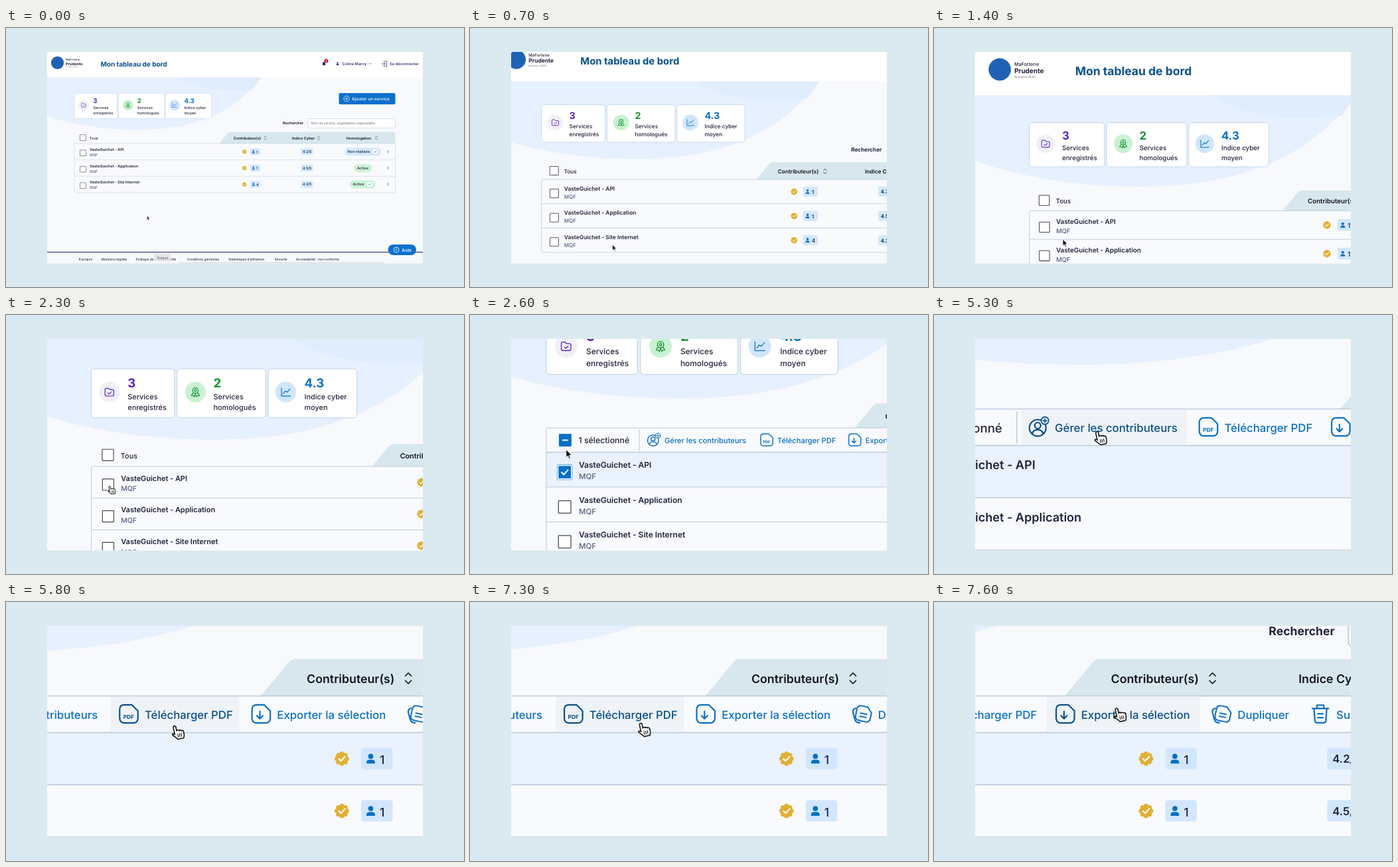
Write an HTML page that moves like this. It is 690 by 390 pixels and loops after 8000 ms.

```html
<!DOCTYPE html>
<html lang="fr">
<head>
<meta charset="utf-8">
<title>Tableau de bord</title>
<style>
  html, body { margin: 0; width: 100%; height: 100%; overflow: hidden; background: #dbeaf0; }
  svg { display: block; width: 690px; height: 390px; }
  text { font-family: Inter, "Open Sans", sans-serif; text-rendering: geometricPrecision; white-space: pre; }
  .line { fill: none; stroke-linecap: round; stroke-linejoin: round; }
</style>
</head>
<body>
<svg id="stage" viewBox="0 0 690 390"></svg>
<script>
const INK = '#23233c', NAVY = '#1c1c78', BLUE = '#0a6fc4', DEEP = '#0a4f8c', BORDER = '#bccbdd';
const ROW_TOP = 174, ROW_H = 24.6, BAR_H = 17.2;

// Drawing helpers
const text = (x, y, size, str, fill = INK, weight = 500) =>
  `<text x="${x}" y="${y}" font-size="${size}" fill="${fill}" font-weight="${weight}">${str}</text>`;
const rect = (x, y, w, h, r, fill, stroke = 'none', sw = .5) =>
  `<rect x="${x}" y="${y}" width="${w}" height="${h}" rx="${r}" fill="${fill}" stroke="${stroke}" stroke-width="${sw}"/>`;
const circle = (x, y, r, fill, stroke = 'none', sw = .6) =>
  `<circle cx="${x}" cy="${y}" r="${r}" fill="${fill}" stroke="${stroke}" stroke-width="${sw}"/>`;
const line = (d, stroke, sw = .6) => `<path class="line" d="${d}" stroke="${stroke}" stroke-width="${sw}"/>`;
const shape = (d, fill) => `<path d="${d}" fill="${fill}"/>`;
const at = (x, y, content, id = '') => `<g ${id && `id="${id}"`} transform="translate(${x} ${y})">${content}</g>`;
const group = (id, content) => `<g id="${id}">${content}</g>`;

const person = fill => circle(0, -1.2, 1.2, fill) + shape('M-2 2.2V1.7Q-2 .4-.6 .4H.6Q2 .4 2 1.7V2.2z', fill);
const tick = (color, sw) => line('M-1.4 .1L-.4 1.1L1.5-1', color, sw);
const sorter = x => at(x, 165.7, line('M-1.4-1.1L0-2.5L1.4-1.1M-1.4 1.1L0 2.5L1.4 1.1', INK, .55));
const box = (x, y) => rect(x, y, 8.8, 8.8, .3, '#fff', '#45454f', .6);

function page() {
  const curve = 'M40 72V124Q50 129 62 133C104 147 150 153.2 200 153.2C290 153 350 124 385 72z';
  return rect(30, 30, 640, 360, 0, '#f8f9fd') + shape(curve, '#e6f0fe') +
    shape('M258 74Q298 101 372 92L385 74z', '#dfedfc') + rect(30, 20, 640, 54.5, 0, '#fff');
}

function header() {
  const bell = shape('M-2.8 1.8Q-2 1-2-.6Q-2-2.8 0-2.8Q2-2.8 2-.6Q2 1 2.8 1.8zM-.9 2.3H.9Q0 3.6-.9 2.3z', NAVY);
  return circle(77.5, 52.4, 9.6, '#1f62b5') +
    text(90, 49.2, 4.1, 'MaForterie') + text(90, 55.7, 5.7, 'Prudente', INK, 700) +
    text(90, 59.4, 2.2, 'Innovation ORVEL', '#777') +
    text(142.5, 57.6, 10, 'Mon tableau de bord', '#0b5090', 700) +
    at(479, 54, bell) + circle(482.4, 49.4, 3, '#d01f2e') + text(481.3, 51, 4.2, '1', '#fff', 600) +
    at(499.5, 53.8, person(NAVY)) + text(506.5, 56, 5.8, 'Coline Marvy', NAVY) +
    line('M547 53L548.6 54.6L550.2 53', NAVY) +
    line('M569 50.2H573.6V57.8H569M566 54H571.3M569.6 52.2L571.4 54L569.6 55.8', NAVY, .7) +
    text(578, 56, 5.8, 'Se déconnecter', NAVY);
}

function cards() {
  const folder = line('M-3.4-2Q-3.4-3-2.4-3H-.8L.3-1.9H2.4Q3.4-1.9 3.4-.9V2Q3.4 3 2.4 3H-2.4Q-3.4 3-3.4 2zM-1.2 .6L-.2 1.5L1.4-.2', '#5a20c0');
  const medal = circle(0, -1.2, 2.2, 'none', '#14912f') + circle(0, -1.2, .8, 'none', '#14912f') +
    line('M-1.7 .6L-3.2 2.6L-1.7 2.7L-.9 3.7L.2 1.2M1.7 .6L3.2 2.6L1.7 2.7L.9 3.7L-.2 1.2', '#14912f');
  const chart = line('M-3.4-3.2V3.1H3.6M-2 1.2L-.4-.9L1 .1L3.2-2.6', '#0a6fc4');
  return [
    [103, 64.6, '3', 'Services', 'enregistrés', '#5a20c0', '#f0f0f6', folder, 117, 131.2],
    [169.5, 69, '2', 'Services', 'homologués', '#14912f', '#c9f1d2', medal, 183.8, 197.8],
    [240.3, 69, '4.3', 'Indice cyber', 'moyen', '#0a6fc4', '#d0e6fc', chart, 254, 268.4],
  ].map(([x, w, value, top, bottom, color, tint, icon, iconX, textX]) =>
    rect(x, 98.2, w, 38, 2.5, '#fff', '#bdd0ea') + circle(iconX, 116.3, 8, tint) + at(iconX, 116.3, icon) +
    text(textX, 112.7, 9.6, value, color, 700) +
    text(textX, 121.9, 5.6, top) + text(textX, 130.2, 5.6, bottom)).join('');
}

function search() {
  return rect(501.5, 98, 85, 17, 2, '#0c70cc') + circle(513, 106.5, 4.1, 'none', '#fff', .7) +
    line('M511 106.5H515M513 104.5V108.5', '#fff', .7) +
    text(521, 108.8, 6.5, 'Ajouter un service', '#fff') +
    text(417, 145.4, 5.5, 'Rechercher', INK, 700) + rect(454.5, 136.5, 132, 14.1, 2, '#fff', BORDER, .6) +
    text(459.5, 145.2, 4.85, 'Nom du service, organisation responsable', '#62626e', 400);
}

function tableHead() {
  return shape('M321 174L334.4 157.9Q335.5 156.6 337.3 156.6H583.5Q586.5 156.6 586.5 159.6V174z', '#d7e7ed') +
    text(342.7, 167.8, 5.55, 'Contributeur(s)', '#15151f', 600) + sorter(390.5) +
    text(431, 167.8, 5.55, 'Indice Cyber', '#15151f', 600) + sorter(471) +
    text(512.7, 167.8, 5.55, 'Homologation', '#15151f', 600) + sorter(558) +
    group('all', box(111.4, 160.7) + text(125.8, 167.7, 5.6, 'Tous'));
}

function rows() {
  const badge = Array.from({ length: 8 }, (_, i) => {
    const a = i * Math.PI / 4;
    return circle(2.3 * Math.cos(a), 2.3 * Math.sin(a), 1.1, '#e0b034');
  }).join('') + circle(0, 0, 2.7, '#e0b034') + tick('#fff', .65);

  const data = [
    ['API', 1, '4.2', 'Non réalisée', 510, 55, '#d4e8fc', true],
    ['Application', 1, '4.5', 'Active', 524.5, 27, '#cdf2d6', false],
    ['Site Internet', 4, '4.3', 'Active', 518, 38.5, '#cdf2d6', true],
  ];
  const cells = data.map(([name, people, score, status, x, w, tint, checked], i) =>
    at(0, ROW_TOP + i * ROW_H,
      (i ? '' : group('picked', rect(103, 0, 483.5, ROW_H, 0, '#e9f2fd'))) +
      (i ? line('M103 0H586.5', BORDER, .5) : '') +
      box(111.6, 9.7) +
      text(126, 11.1, 5.65, 'VasteGuichet - ' + name, INK, 600) + text(126, 19.1, 5.4, 'MQF', '#5a5f84') +
      at(359.2, 12.3, badge) +
      rect(368.3, 7.2, 14.8, 10.1, 1.3, '#d2e7fd') + at(372.8, 12.4, person(BLUE)) + text(377, 14.8, 5.6, people) +
      rect(444.5, 7.2, 18, 10.1, 1.3, '#d2e7fd') + text(447, 14.3, 5.2, score + '/5', INK, 600) +
      rect(x, 6.3, w, 12, 6, tint) + text(x + 4.5, 14.2, 5.65, status) +
      (checked ? circle(x + w - 8.5, 12.3, 3.7, '#fff') + at(x + w - 8.5, 12.3, tick(DEEP, .7)) : '') +
      line('M574.6 10.1L576.6 12.2L574.6 14.3', BLUE, .8))).join('');

  const checkedBox = rect(110.7, 8.8, 10.6, 10.6, .8, '#fff', '#6fb0ee', .5) + rect(111.6, 9.7, 8.8, 8.8, .4, '#0a6fc4') +
    at(116, 14.1, `<g transform="scale(1.5)">${tick('#fff', .6)}</g>`);
  return rect(103, ROW_TOP, 483.5, ROW_H * 3, 1.5, '#f9fafd') + cells +
    rect(103, ROW_TOP, 483.5, ROW_H * 3, 1.5, 'none', BORDER) + at(0, ROW_TOP, checkedBox, 'checked');
}

// Toolbar buttons: label, left edge, width, icon x, text x
const sheet = 'M-2-4.2H1.5L4.3-1.4V2Q4.3 4.3 2 4.3H-2Q-4.3 4.3-4.3 2V-2Q-4.3-4.2-2-4.2z';
const buttons = [
  ['Gérer les contributeurs', 171, 77.8, 178.9, 186.6],
  ['Télécharger PDF', 250.5, 60.5, 258.9, 266.4],
  ['Exporter la sélection', 312.5, 72.3, 321.2, 328.7],
  ['Dupliquer', 386.5, 45, 394.7, 402.3],
  ['Supprimer', 433, 45, 441.3, 448.8],
];

function toolbar() {
  const stroke = (d, w = .68) => line(d, 'currentColor', w);
  const ring = (x, y, r) => circle(x, y, r, 'none', 'currentColor', .68);
  const icons = [
    ring(-.4, .5, 3.9) + ring(-.4, -.6, 1.4) + stroke('M-3 3.3Q-2.6 1.4-.4 1.4Q1.8 1.4 2.2 3.3') +
      circle(3, -2.9, 1.75, '#f9fafd', 'currentColor', .55) + stroke('M2.1-2.9H3.9M3-3.8V-2', .5),
    stroke(sheet) + text(-2.6, 2.3, 2.6, 'PDF', 'currentColor', 700),
    stroke(sheet) + stroke('M-.6-1.2V2.2M-2 .9L-.6 2.3L.8 .9'),
    `<g transform="rotate(12) translate(.8 -.2) scale(.82)">${stroke(sheet, .75)}${stroke('M-1.8 0H1.8M-1.8 1.8H1.8', .75)}</g>` +
      stroke('M-2.9-2.6Q-4.6-2-4.2-.6L-3.3 2.7Q-2.8 4.3-1 4.2'),
    stroke('M-3.8-2.5H3.8M-1.6-2.6V-4.1H1.6V-2.6M-3-2.5L-2.6 3.2Q-2.5 4.2-1.5 4.2H1.5Q2.5 4.2 2.6 3.2L3-2.5M-1.2 0H1.2M-1.2 1.8H1.2'),
  ];
  return rect(103, ROW_TOP, 483.5, BAR_H, 1, '#f9fafd', BORDER) +
    rect(111.9, 178.2, 8.9, 8.9, .5, '#0a6fc4') + line('M114.6 182.7H118.1', '#fff', .9) +
    text(125.8, 185, 5.8, '1 sélectionné') + line('M168.7 175.4V190', BORDER, .5) +
    buttons.map(([label, x, w, iconX, textX], i) =>
      `<g class="tool" color="${BLUE}">${rect(x, 174.3, w, 16.6, 0, '#eff3f8')}` +
      at(iconX, 182.4, icons[i]) + text(textX, 184.8, 5.24, label, 'currentColor') + '</g>').join('');
}

function footer() {
  const links = [[109.5, 'À propos'], [143.5, 'Mentions légales'], [195.5, 'Politique de confidentialité'],
    [272.5, 'Conditions générales'], [335, 'Statistiques d’utilisation'], [404.5, 'Sécurité'],
    [437, 'Accessibilité : non conforme']];
  return rect(30, 337, 640, 1.1, 0, '#29297f') + links.map(([x, label]) => text(x, 350, 4.8, label)).join('') +
    rect(575.5, 326, 42.5, 16, 8, '#0c70cc') + circle(588, 334, 4, 'none', '#fff', .8) +
    text(586.5, 336, 5.2, '?', '#fff', 600) + text(596, 336.6, 7, 'Aide', '#fff') +
    group('dock', rect(260, 352, 310, 4, 2, '#0001') + rect(222.5, 340, 26, 11.5, 1.5, '#e6e6e8e8') +
      text(227.5, 347.8, 5.2, 'Disque', '#55555d', 400));
}

const arrow = '<path id="arrow" d="M0 0V5.7L1.3 4.5L2.2 6.6L3.1 6.2L2.2 4.2H4z" fill="#111" stroke="#fff" stroke-width=".4"/>';
const hand = group('hand', '<g transform="rotate(-12)">' +
  '<path d="M-.6 4V.6Q0-.4.6.6V2.5Q1.2 2 1.7 2.7Q2.3 2.3 2.8 3Q3.4 2.7 3.7 3.5V5Q3.6 5.8 3.1 6.6H.4Q-.3 5.6-1.7 4.1Q-1.8 3.1-.6 4z" fill="#fff" stroke="#151515" stroke-width=".5"/>' +
  line('M.8 4.2V5.6M1.6 4.2V5.6M2.4 4.2V5.6', '#151515', .35) + '</g>');

document.getElementById('stage').innerHTML =
  '<clipPath id="window"><rect x="62" y="36" width="566" height="318.5" rx="3"/></clipPath>' +
  '<g clip-path="url(#window)">' + group('camera',
    page() + header() + cards() + search() + tableHead() + group('rows', rows()) +
    group('bar', toolbar()) + footer() + group('cursor', arrow + hand)) + '</g>';

// Camera: time, zoom, then the page point at the centre of the stage
const cameraTrack = [
  [400, 1, 345, 195], [900, 1.75, 218.06, 128.17], [2100, 1.75, 218.06, 128.17], [2500, 2.13, 211, 185.73],
  [4000, 2.13, 211, 185.73], [4300, 3.2, 237.5, 190.72], [5300, 3.2, 237.5, 190.72],
  [5800, 3.2, 308.9, 190.72], [7200, 3.2, 308.9, 190.72], [7600, 3.2, 367.2, 190.72],
];
// Cursor: time, then the tip on the page
const cursorTrack = [
  [0, 212.5, 283], [300, 175, 240], [1300, 175, 240], [1400, 131.8, 198.5], [1900, 117, 189.2],
  [2900, 117, 189.2], [3800, 196.4, 185], [5200, 196.4, 185], [5300, 206.3, 184.5],
  [5800, 280.3, 188], [7200, 280.3, 188], [7600, 345.2, 179.7],
];

function sample(track, t) {
  const next = track.findIndex(key => key[0] > t);
  if (next === 0) return track[0].slice(1);
  if (next < 0) return track.at(-1).slice(1);
  const a = track[next - 1], b = track[next];
  const p = (t - a[0]) / (b[0] - a[0]), eased = p * p * (3 - 2 * p);
  return a.slice(1).map((v, i) => v + (b[i + 1] - v) * eased);
}

const el = id => document.getElementById(id);
const show = (node, on) => { node.style.display = on ? '' : 'none'; };
const tools = [...document.querySelectorAll('.tool')];

function render(t) {
  const [zoom, centreX, centreY] = sample(cameraTrack, t);
  const [x, y] = sample(cursorTrack, t);
  const selected = t >= 2500;
  const hovered = selected ? buttons.findIndex(([, left, w]) => x >= left && x < left + w) : -1;

  el('camera').setAttribute('transform', `translate(345 195) scale(${zoom}) translate(${-centreX} ${-centreY})`);
  el('cursor').setAttribute('transform', `translate(${x} ${y})`);
  el('rows').setAttribute('transform', `translate(0 ${selected ? BAR_H : 0})`);
  ['bar', 'picked', 'checked'].forEach(id => show(el(id), selected));
  show(el('all'), !selected);
  el('dock').style.opacity = Math.max(0, 1 - t / 300);

  const pointing = hovered >= 0 || (t >= 1800 && !selected);
  show(el('hand'), pointing);
  show(el('arrow'), !pointing);
  tools.forEach((tool, i) => {
    tool.setAttribute('color', i === hovered ? DEEP : BLUE);
    show(tool.firstChild, i === hovered);
  });
}

const start = performance.now();
function frame() {
  render(Math.floor((performance.now() - start) % 8000 / 100) * 100);
  requestAnimationFrame(frame);
}
frame();
</script>
</body>
</html>
```
